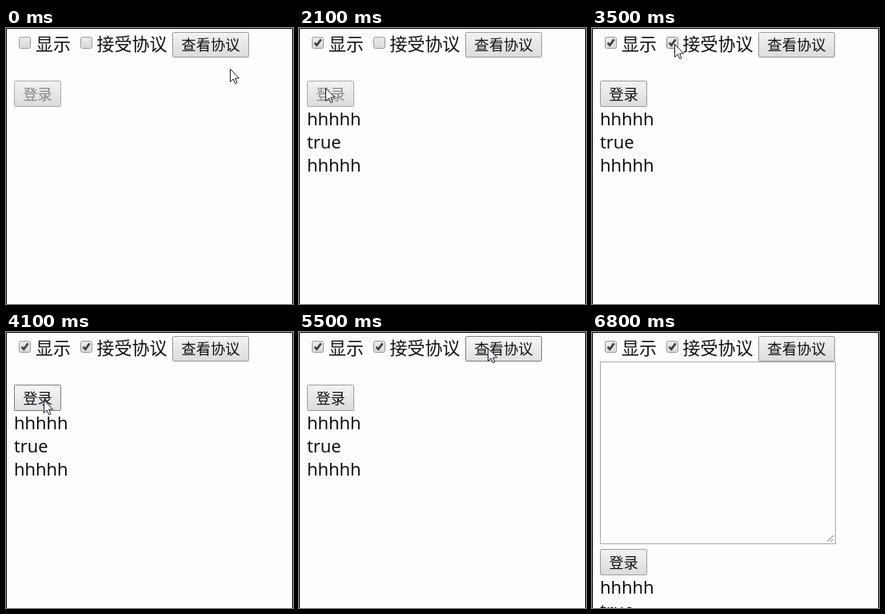
An HTML page for the animation above (7600 ms loop, 359 by 346 pixels).

```html
<!DOCTYPE html>
<html lang="zh-CN">
<head>
<meta charset="utf-8">
<style>
  html, body { margin: 0; width: 100%; height: 100%; overflow: hidden; background: #fff; }
  svg { display: block; }
  text { font: 22px "Open Sans", "Noto Sans CJK SC", "Noto Sans CJK", sans-serif; white-space: pre; }
  .label { font-family: "Noto Sans CJK SC", "Noto Sans CJK", sans-serif; }
  .button text { font: 18.35px "Noto Sans CJK SC", "Noto Sans CJK", sans-serif; }
</style>
</head>
<body>
<svg width="359" height="346" viewBox="0 0 359 346">
  <defs>
    <linearGradient id="face" x2="0" y2="1"><stop stop-color="#f3f3f4"/><stop offset="1" stop-color="#dbdbdc"/></linearGradient>
    <linearGradient id="hover" x2="0" y2="1"><stop stop-color="#f6f6f7"/><stop offset="1" stop-color="#e0e0e1"/></linearGradient>
    <linearGradient id="pressed" x2="0" y2="1"><stop stop-color="#d8d8d8"/><stop offset="1" stop-color="#e6e6e6"/></linearGradient>
    <linearGradient id="box" x2="0" y2="1"><stop stop-color="#ebebeb"/><stop offset="1" stop-color="#d9d9d9"/></linearGradient>
  </defs>
  <rect width="359" height="346" fill="#fefefe"/>
  <g id="page"></g>
  <path d="M.5 346V.5H358.5V346" fill="none" stroke="#000"/>
  <path id="arrow" d="M.5 .5V16.5L4.2 13 6.7 18.6 9 17.6 6.6 12H11.6Z" fill="#fff" stroke="#1c1c2c"/>
  <path id="beam" d="M-3 -8.5H-1L0 -7.5 1 -8.5H3M0 -7.5V7.5M-3 8.5H-1L0 7.5 1 8.5H3" fill="none" stroke="#222"/>
</svg>
<script>
const LOOP = 7600, TICK = 100;
const $ = id => document.getElementById(id);

const CLICK = { show: 800, accept: 3400, login: 4600, view: 5700 };
const POINTER_HIDDEN = 6800;
const HOME = [280, 51];

// The pointer curves past `via` to each stop, slowing down as it arrives.
const moves = [
  { at: 100, ticks: 6, via: [120, 79], to: [23, 21] },
  { at: 1700, ticks: 2, to: [138, 40] },
  { at: 2000, ticks: 6, via: [-10, 85], to: [34, 83] },
  { at: 2700, ticks: 5, via: [12, 65], to: [107, 19] },
  { at: 3300, ticks: 1, to: [103, 20] },
  { at: 3800, ticks: 4, to: [47, 85] },
  { at: 4900, ticks: 7, via: [222, 66], to: [236, 20] },
  { at: 5900, ticks: 8, via: [110, 340], to: [221, 290] },
  { at: 6700, ticks: 1, to: [328, 184] }
];

const easeOut = k => 1 - (1 - k) ** 2;
const bezier = (a, b, c, u) => (1 - u) ** 2 * a + 2 * u * (1 - u) * b + u * u * c;

function pointerAt(t) {
  let from = HOME;
  for (const { at, ticks, to, via } of moves) {
    if (t < at) break;
    const u = easeOut(Math.min(1, ((t - at) / TICK + 1) / ticks));
    const bend = via || [0, 1].map(i => (from[i] + to[i]) / 2);
    from = to.map((end, i) => Math.round(bezier(from[i], bend[i], end, u)));
  }
  return from;
}

const inside = ([px, py], x, y, w, h) => px >= x && px < x + w && py >= y && py < y + h;
const held = (t, click) => t >= click && t < click + TICK;

const text = (x, y, string, extra = "") => `<text x="${x}" y="${y}" ${extra}>${string}</text>`;

function checkbox(x, pointer, checked, pressed) {
  const hot = inside(pointer, x, 11, 15, 15);
  const tick = `<path d="M${x + 3.6} 18.6L${x + 6.3} 21.6 ${x + 11.6} 14.2" fill="none" stroke="#404040" stroke-width="2.7"/>`;
  return `<rect x="${x + .5}" y="11.5" width="14" height="14" rx="2" fill="url(#${pressed ? "pressed" : "box"})" stroke="${hot ? "#858585" : "#999"}"/>`
    + (checked ? tick : "");
}

function button(x, y, w, h, caption, pointer, { enabled = true, pressed = false } = {}) {
  const hot = enabled && inside(pointer, x, y, w, h);
  const fill = pressed ? "pressed" : hot ? "hover" : "face";
  const edge = hot ? "#7c7c7c" : enabled ? "#9a9a9a" : "#a9a9a9";
  return `<g class="button"><rect x="${x + .5}" y="${y + .5}" width="${w - 1}" height="${h - 1}" rx="1" fill="url(#${fill})" stroke="${edge}"/>`
    + text(x + w / 2, y + h / 2 + 7.2, caption, `text-anchor="middle" fill="${enabled ? "#111" : "#888"}"`) + "</g>";
}

function textarea() {
  return `<rect x="10.5" y="37.5" width="294" height="228" fill="#fefefe" stroke="#a9a9a9"/>
    <path d="M294 263L302 255M298.5 263L302 259.5" stroke="#777" fill="none"/>`;
}

function render(t) {
  const visible = t < POINTER_HIDDEN;
  const pointer = visible ? pointerAt(t) : [-50, -50];
  const shown = t >= CLICK.show + TICK;
  const accepted = t >= CLICK.accept + TICK;
  const open = t >= CLICK.view;
  const shift = open ? 206 : 0;

  let page = checkbox(16, pointer, shown, held(t, CLICK.show))
    + text(37, 28, "显示", 'class="label" fill="#111"')
    + checkbox(93, pointer, accepted, held(t, CLICK.accept))
    + text(113.5, 28, "接受协议", 'class="label" fill="#111"')
    + button(208, 5, 96, 32, "查看协议", pointer)
    + button(10, 66 + shift, 59, 33, "登录", pointer, { enabled: accepted, pressed: held(t, CLICK.login) });
  if (open) page += textarea();
  if (shown) ["hhhhh", "true", "hhhhh"].forEach((line, i) => {
    page += text(10, 122 + shift + i * 29, line);
  });
  $("page").innerHTML = page;

  const typing = open && inside(pointer, 10, 38, 295, 228);
  for (const id of ["arrow", "beam"]) {
    $(id).setAttribute("transform", `translate(${pointer})`);
    $(id).style.display = visible && (id === "beam") === typing ? "" : "none";
  }
}

let lastTick = -1;
function frame(now) {
  const tick = Math.floor((now % LOOP) / TICK) * TICK;
  if (tick !== lastTick) render(lastTick = tick);
  requestAnimationFrame(frame);
}
render(0);
requestAnimationFrame(frame);
</script>
</body>
</html>
```
